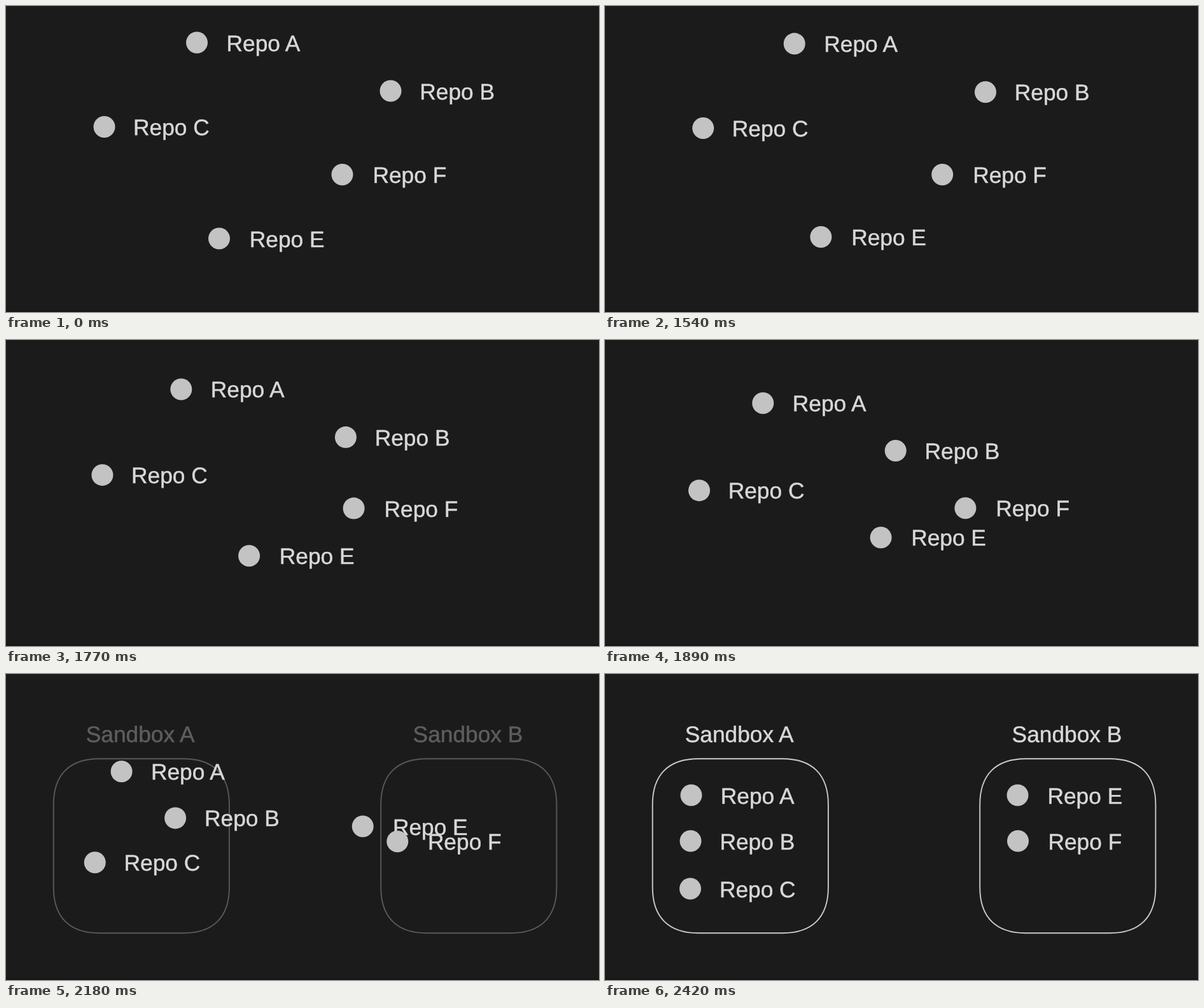
An HTML page for the animation above (5.63 s loop, 932 by 481 pixels).

```html
<!DOCTYPE html>
<html lang="en">
<head>
<meta charset="utf-8">
<title>Repos into sandboxes</title>
<style>
  html, body { margin: 0; width: 100%; height: 100%; overflow: hidden; background: #1b1b1b; }
  svg { display: block; width: 932px; height: 481px; }
  text {
    font: 35.3px "Liberation Sans", Arial, sans-serif;
    fill: #d8d8d8;
    stroke: #d8d8d8;
    stroke-width: .5;
    text-rendering: geometricPrecision;
  }
  .mark { fill: #c3c3c3; }
  .box { fill: none; stroke: #cacaca; stroke-width: 1.9; }
</style>
</head>
<body>
<svg id="stage" viewBox="0 0 932 481">
  <rect width="932" height="481" fill="#1b1b1b"/>
  <rect y="478" width="932" height="3" fill="#181517"/>
</svg>
<script>
const LOOP = 5630;
const TICKS = [1430, 1490, 1550, 1600, 1660, 1720, 1780, 1830, 1890,
               1950, 2000, 2060, 2120, 2180, 2240, 2300, 2360, 2420];

// [time, value] pairs, linear in between
const PHASE = [[1430, .028], [1660, .209], [1890, .379], [2060, .506], [2300, .784], [2420, 1]];
const FADE = [[2060, 0], [2300, .7], [2420, 1]];

// name, mark centre at start and end, label origin relative to the mark at start and end
const REPOS = [
  ['A', [300, 57.5], [135.5, 190.5], 46.6, 46.3],
  ['B', [604.5, 133.5], [134.5, 262.5], 45.8, 46],
  ['C', [154.5, 190], [134, 337.5], 45.6, 45.9],
  ['E', [335, 365.5], [648.5, 190.5], 47.8, 47],
  ['F', [528.5, 265], [649, 262.5], 48, 47.5]
];

const stage = document.getElementById('stage');

function add(parent, tag, attrs, text = '') {
  const node = document.createElementNS('http://www.w3.org/2000/svg', tag);
  for (const key in attrs) node.setAttribute(key, attrs[key]);
  node.textContent = text;
  return parent.appendChild(node);
}

function softBox(x, y, w, h, r = 72, c = 25) {
  const corner = (a, b, d, e, p, q) => `C${a} ${b} ${d} ${e} ${p} ${q}`;
  const X = x + w, Y = y + h;
  return `M${x + r} ${y}H${X - r}` + corner(X - c, y, X, y + c, X, y + r) +
    `V${Y - r}` + corner(X, Y - c, X - c, Y, X - r, Y) +
    `H${x + r}` + corner(x + c, Y, x, Y - c, x, Y - r) +
    `V${y + r}` + corner(x, y + c, x + c, y, x + r, y) + 'Z';
}

const sandboxes = add(stage, 'g', { opacity: 0 });
[['A', 74.7, 125.8], ['B', 589.2, 639.6]].forEach(([name, x, labelX]) => {
  add(sandboxes, 'path', { class: 'box', d: softBox(x, 133.3, 276.2, 273.9) });
  add(sandboxes, 'text', { x: labelX, y: 107 }, 'Sandbox ' + name);
});

const repos = REPOS.map(([name, from, to, gapFrom, gapTo]) => {
  const group = add(stage, 'g', {});
  add(group, 'circle', { class: 'mark', r: 17 });
  const label = add(group, 'text', { y: 13 }, 'Repo ' + name);
  return { group, label, from, to, gapFrom, gapTo };
});

const mix = (a, b, p) => a + (b - a) * p;

function sample(track, t) {
  if (t < track[0][0]) return 0;
  for (let i = 1; i < track.length; i++) {
    const [t0, v0] = track[i - 1], [t1, v1] = track[i];
    if (t < t1) return mix(v0, v1, (t - t0) / (t1 - t0));
  }
  return track[track.length - 1][1];
}

function draw(time) {
  const now = time % LOOP;
  const t = TICKS.reduce((held, tick) => tick <= now ? tick : held, 0);
  const p = (1 - Math.cos(Math.PI * sample(PHASE, t))) / 2;
  for (const { group, label, from, to, gapFrom, gapTo } of repos) {
    const x = mix(from[0], to[0], p), y = mix(from[1], to[1], p);
    group.setAttribute('transform', `translate(${x} ${y})`);
    label.setAttribute('x', mix(gapFrom, gapTo, p));
  }
  sandboxes.setAttribute('opacity', sample(FADE, t));
}

const start = performance.now();
function frame() {
  draw(performance.now() - start);
  requestAnimationFrame(frame);
}
frame();
</script>
</body>
</html>
```
